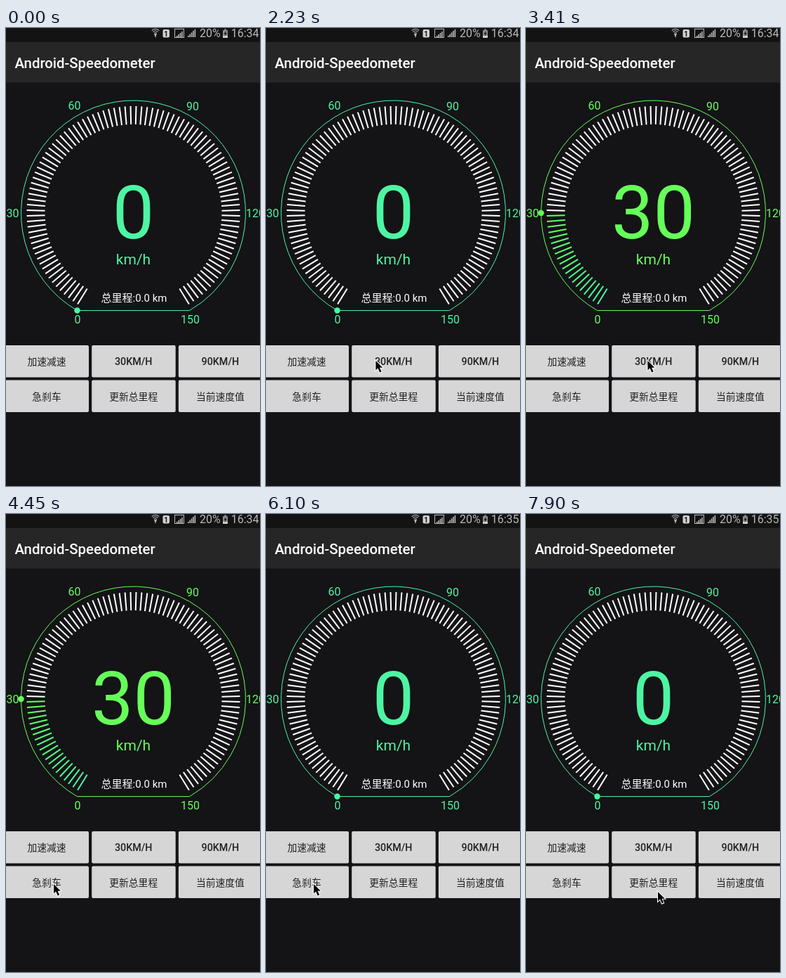
Write an HTML page with a canvas that moves like this. It is 362 px wide and 651 px high and loops after 8 s.

```html
<!DOCTYPE html>
<html lang="zh">
<head>
<meta charset="utf-8">
<style>
html, body { margin: 0; height: 100%; overflow: hidden; background: #141316; }
canvas { display: block; }
</style>
</head>
<body>
<canvas id="stage" width="362" height="651"></canvas>
<script>
const ctx = document.getElementById('stage').getContext('2d');
const LOOP = 8000, CX = 181.5, CY = 263, R = 160, GREY = '#b9b9b9';
const FONT = 'Roboto, "Noto Sans CJK SC", "Noto Sans CJK", sans-serif';
const rad = deg => deg * Math.PI / 180;
const clamp = v => Math.min(1, Math.max(0, v));
const mix = (a, b, k) => a + (b - a) * k;

function text(str, x, y, size, color, align = 'center', weight = 400) {
  ctx.font = `${weight} ${size}px ${FONT}`;
  ctx.fillStyle = color;
  ctx.textAlign = align;
  ctx.fillText(str, x, y);
}

function rect(x, y, w, h, color, r = 0) {
  ctx.fillStyle = color;
  ctx.beginPath();
  ctx.roundRect(x, y, w, h, r);
  ctx.fill();
}

function poly(points, color) {
  ctx.fillStyle = color;
  ctx.beginPath();
  points.forEach(([x, y]) => ctx.lineTo(x, y));
  ctx.closePath();
  ctx.fill();
}

function stepTime(t) {
  if (t >= 4000) return 4000 + Math.floor((t - 4000) / 150) * 150;
  const step = 4000 / 27;
  return Math.floor((t + 4) / step) * step;
}

// Percent of the dial, 0 to 100; each percent is one tick.
function percentAt(t) {
  const rest = start => (1 - clamp((t - start) / 750)) ** 2;
  return Math.round(t < 4900 ? 20 * (1 - rest(2767)) : 20 * rest(4975));
}

function colorAt(percent) {
  const low = [77, 245, 163], mid = [84, 255, 130], high = [102, 255, 89];
  const [a, b, k] = percent < 9 ? [low, mid, percent / 9] : [mid, high, (percent - 9) / 11];
  return `rgb(${a.map((v, i) => Math.round(mix(v, b[i], k)))})`;
}

function statusBar(t) {
  rect(0, 0, 362, 20, '#141314');
  ctx.strokeStyle = GREY;
  ctx.lineWidth = 1.2;
  for (const r of [2.5, 5, 7.5]) {
    ctx.beginPath();
    ctx.arc(213, 9, r, rad(-135), rad(-45));
    ctx.stroke();
  }
  poly([[211, 8], [215, 8], [213, 14]], GREY);
  rect(223.5, 2, 9.5, 11.5, '#d0d0d0', 2);
  text('1', 228.2, 11.5, 10, '#141314', 'center', 700);
  ctx.lineWidth = 1;
  ctx.strokeRect(240.5, 1.5, 13, 12);
  for (const [x, n] of [[243, 4], [259, 5]])
    for (let i = 0; i < n; i++) {
      const h = 2 + i * (n === 4 ? 2 : 2.3);
      rect(x + i * 2.4, 13 - h, 1.6, h, GREY);
    }
  text('20%', 276, 13, 16, GREY, 'left');
  rect(309, 3, 7, 11, '#8b8b8b', 1);
  rect(311, 1.5, 3, 2, '#8b8b8b');
  rect(309, 11, 7, 3, '#d0d0d0', 1);
  poly([[313.5, 4], [310.5, 8.5], [312.5, 8.5], [311.5, 12], [315, 7.3], [313, 7.3]], '#141314');
  text(t < 4600 ? '16:34' : '16:35', 360.5, 13, 16, GREY, 'right');
}

function dial(percent) {
  const color = colorAt(percent);
  ctx.strokeStyle = color;
  ctx.lineWidth = 1;
  ctx.beginPath();
  ctx.arc(CX, CY, R, rad(120), rad(420));
  ctx.closePath();
  ctx.stroke();

  ctx.lineWidth = 2;
  for (let i = 0; i < 100; i++) {
    const a = rad(121.5 + i * 3), c = Math.cos(a), s = Math.sin(a);
    ctx.strokeStyle = i < percent ? colorAt(i) : '#fff';
    ctx.beginPath();
    ctx.moveTo(CX + 126 * c, CY + 126 * s);
    ctx.lineTo(CX + 152 * c, CY + 152 * s);
    ctx.stroke();
  }

  const a = rad(120 + percent * 3);
  ctx.fillStyle = color;
  ctx.beginPath();
  ctx.arc(CX + R * Math.cos(a), CY + R * Math.sin(a), 4.2, 0, 7);
  ctx.fill();

  [['0', 102, 420], ['30', 9.5, 269], ['60', 97.5, 116],
   ['90', 266, 117], ['120', 355.5, 269], ['150', 262.5, 420]]
    .forEach(([s, x, y]) => text(s, x, y, 16, color));
  text(Math.floor(percent * 1.5), CX, 299, 106, color);
  text('km/h', CX, 336, 21, color);
  text('总里程:0.0 km', 182.5, 388.5, 15, '#fff');
}

function buttons() {
  [['加速减速', '30KM/H', '90KM/H'], ['急刹车', '更新总里程', '当前速度值']].forEach((row, j) =>
    row.forEach((label, i) => {
      const x = -1.5 + i * 123.7, y = 451 + j * 49.5, latin = label.endsWith('H');
      rect(x, y, 119.5, 45.5, '#d6d6d6', 2);
      text(label, x + 59.5, y + 28, latin ? 14.3 : 13.8, '#212121', 'center', latin ? 500 : 400);
    }));
}

// time, x, y of the pointer tip
const path = [[450, 7, 500], [1190, 112.5, 472], [1930, 112.5, 472], [2380, 173, 472],
  [3860, 173, 472], [4300, 67.5, 525], [7000, 67.5, 525], [7450, 118, 586],
  [7900, 187.5, 536], [8000, 187.5, 536]];

function pointer(t) {
  const i = path.findIndex(p => p[0] > t);
  if (i < 1) return;
  const [t0, x0, y0] = path[i - 1], [t1, x1, y1] = path[i];
  let k = (t - t0) / (t1 - t0);
  k = k * k * (3 - 2 * k);
  ctx.save();
  ctx.translate(mix(x0, x1, k), mix(y0, y1, k));
  const arrow = [[0.5, 1], [0.5, 14.5], [3.6, 11.6], [6.2, 17.6], [8.6, 16.6], [6.1, 10.8], [10.3, 10.8]];
  ctx.strokeStyle = '#fff';
  ctx.lineWidth = 2;
  poly(arrow, '#000');
  ctx.stroke();
  poly(arrow, '#000');
  ctx.restore();
}

function draw(now) {
  const t = stepTime(now % LOOP);
  rect(0, 0, 362, 651, '#141316');
  rect(0, 20, 362, 57.5, '#262626');
  statusBar(t);
  text('Android-Speedometer', 12.5, 56.5, 20.4, '#fff', 'left', 500);
  dial(percentAt(t));
  buttons();
  pointer(t);
  requestAnimationFrame(draw);
}
requestAnimationFrame(draw);
</script>
</body>
</html>
```
